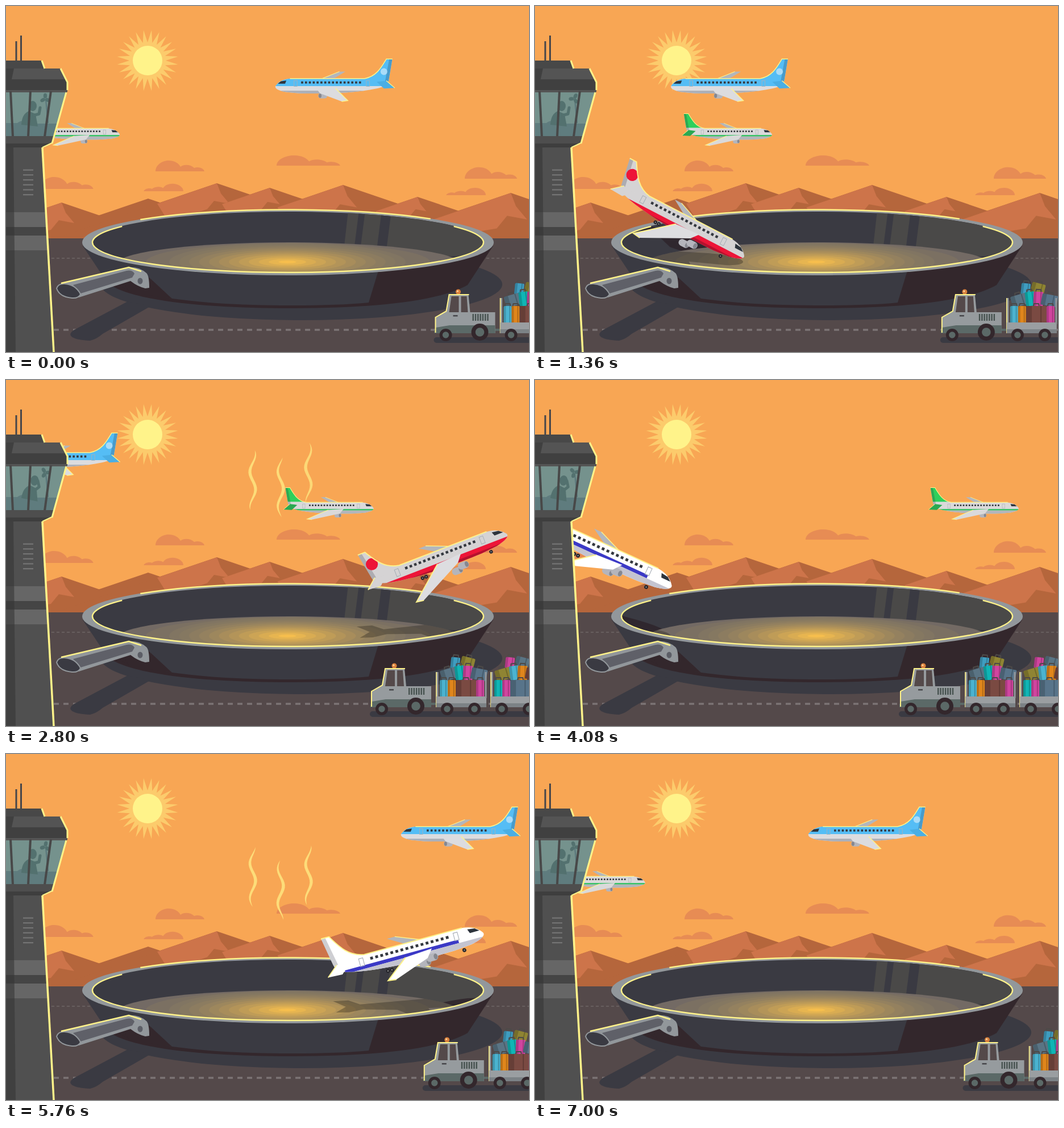
These frames come from a looping animation (920x609 px, 7040 ms). An HTML page:

```html
<!DOCTYPE html>
<html lang="en">
<head>
<meta charset="utf-8">
<title>Airport frying pan</title>
<style>
html, body { margin: 0; width: 100%; height: 100%; overflow: hidden; background: #f8a654; }
svg { display: block; width: 100%; height: 100%; }
</style>
</head>
<body>
<svg id="stage" viewBox="0 0 920 609"></svg>
<script>
const LOOP = 7040, GLOW = '#fff38a', DARK = '#3a3a42', DEEP = '#33272c', STEEL = '#92979b';
const { sin, cos, PI, hypot } = Math;

// Shape helpers
const poly = (pts, fill, more = '') => `<polygon points="${pts}" fill="${fill}" ${more}/>`;
const path = (d, fill, more = '') => `<path d="${d}" fill="${fill}" ${more}/>`;
const line = (pts, color, w = 2, more = '') =>
  `<polyline points="${pts}" fill="none" stroke="${color}" stroke-width="${w}" ${more}/>`;
const oval = (x, y, rx, ry, fill, more = '') =>
  `<ellipse cx="${x}" cy="${y}" rx="${rx}" ry="${ry}" fill="${fill}" ${more}/>`;
const dot = (x, y, r, fill) => oval(x, y, r, r, fill);
const box = (x, y, w, h, fill, more = '') =>
  `<rect x="${x}" y="${y}" width="${w}" height="${h}" fill="${fill}" ${more}/>`;
const group = (body, more = '') => `<g ${more}>${body}</g>`;
const range = (n, f) => Array.from({ length: n }, (_, i) => f(i)).join(' ');

function sky() {
  const rays = range(48, i => {
    const a = (i + 1) * PI / 24, r = i % 2 ? 32 : 54;
    return `${249 + r * cos(a)},${96 + r * sin(a)}`;
  });
  const cloud = (x, y, w, h = Math.abs(w)) =>
    path('M0,0c0-12 13-19 23-19s17 4 21 11c6-5 18-4 24 2c8-3 17 1 18 6z', '#e78c54',
      `transform="translate(${x} ${y}) scale(${w} ${h})"`);
  return box(0, 0, 920, 609, '#f8a654') + poly(rays, '#fccb6c') + dot(249, 96, 26, GLOW) +
    cloud(263, 291, 1) + cloud(312, 326, -.81, .7) + cloud(476, 281, 1.3, .95) +
    cloud(807, 304, 1.07) + cloud(844, 333, -.81, .68) + cloud(59, 322, 1.1);
}

// Every mountain has the same slopes; k sizes its sunlit face
function mountain([x, y, k]) {
  const foot = 412 - y, at = (dx, dy) => `${x + dx * k},${y + dy * k}`;
  return poly(`${x},${y} ${x + foot / .34},412 ${x - foot / .34},412`, '#b5663c') +
    poly([at(0, 0), at(7, 18), at(22, 36), at(-5, 31), at(-19, 48), at(-90, 60), at(-105, 36)].join(' '), '#cd744a');
}

function land() {
  return [[250, 339, 0], [98, 346, 1], [371, 312, 1], [464, 320, .8], [593, 315, 1.1], [724, 336, .7], [888, 329, 1.3]]
    .map(mountain).join('') +
    box(0, 409, 920, 200, '#54494a') +
    line('80,444 920,444', '#6e6566', 1.5, 'stroke-dasharray="5 4"') +
    line('84,570 920,570', '#7b7374', 3.5, 'stroke-dasharray="9 8"');
}

const inner = oval(496, 415.5, 344, 53.5, DARK);
const floorOval = fill => oval(497, 454, 302, 38, fill);

function floor() {
  const mix = (a, b, k) => Math.round(a + (b - a) * k);
  const rings = range(12, i => {
    const rx = 208 - i * 17.5, k = (i / 11) ** 1.4;
    return oval(495, 450.5, rx, rx * .16, `rgb(${mix(129, 246, k)},${mix(117, 190, k)},${mix(98, 77, k)})`);
  });
  return floorOval('#736a64') + oval(496, 451, 250, 34, '#7b7062') + rings;
}

const shadePath = 'M0,0C-5,-9-40,-9-60,-9L-215,-4-235,-12-262,-12-240,-1-258,8-235,9-210,5-150,9-130,18-90,18-95,9-30,9Q0,7 0,0Z';
const shades = (kind, fill) => range(2, i => path(shadePath, fill, `id="${kind}${i}"`));

// Lit part of a rim ellipse between two angles in degrees
function rim(rx, ry, from, to) {
  const at = a => `${496 + rx * cos(a * PI / 180)},${416 + ry * sin(a * PI / 180)}`;
  return path(`M${at(from)}A${rx},${ry} 0 ${to - from > 180 ? 1 : 0} 1 ${at(to)}`, 'none',
    `stroke="${GLOW}" stroke-width="2.4"`);
}

function pan() {
  const stripe = (x, w) => poly(`${x},360 ${x + w},360 ${x + w - 9},430 ${x - 9},430`, DARK);
  return oval(520, 490, 353, 63, DARK) +
    path('M214,520L120,570C104,580 118,588 148,589Q160,586 170,577L255,528Z', DARK) +
    path('M135,422L182,490C230,522 370,532 500,532C640,532 760,521 812,491L857,422Z', DEEP) +
    path('M135,422L172,478C230,517 370,527 500,527C550,527 600,526 638,522L655,466Z', DARK) +
    poly('252,478 292,515 225,505 190,488', DEEP) +
    oval(496, 416, 362, 58, STEEL) + inner +
    group(
      path('M602,360L593,440H860V360Z', '#4a4948') + stripe(621, 11) + stripe(661, 17) +
      group(shades('wall', '#2e242a'), 'opacity=".8"') + floor() +
      group(group(shades('floor', '#1c1a14'), 'opacity=".32"'), 'clip-path="url(#base)"'),
      'clip-path="url(#inside)"') +
    rim(361, 57.5, -136, -46) + rim(344, 53, -32, 212) +
    // handle
    poly('190,486 208,488 216,502', DEEP) +
    path('M100,488L215,460Q233,458 247,470Q252,475 252,496L245,497Q232,494 219,484L128,513Z', STEEL) +
    path('M118,491L212,466Q222,464 226,471L222,478L131,506Z', '#5f6068') +
    path('M89,497Q92,488 103,489Q122,490 131,507Q128,515 116,514Q94,512 89,497Z', DARK,
      `stroke="${STEEL}" stroke-width="2"`) +
    oval(236, 484, 4.5, 5.5, '#5c5e66') +
    line('97,488 216,460 238,467', GLOW, 2.5);
}

// One airliner shape, 100 units long, nose at the origin and pointing right
const HULL = 'M0,0C-2,-3-6,-6.3-14,-6.3H-74C-84,-8-88,-16-92,-22.5H-97L-94,-5C-93,0-88,1-84,2C-66,6-40,6.5-20,6L-9,5Q1,3 0,0Z';

function jet(id, { length, turn = 1, skin, wing = skin, stab = skin, tip: [tx, ty], bands, mark = '', engines = 1, gear = 0 }) {
  const engine = i => box(-43 + i * 5, ty * .35 + 1.5 - i * 2, 7.5, 4.6, '#b4b5bc', 'rx="2.3"') +
    oval(-37 + i * 5, ty * .35 + 3.8 - i * 2, 1.2, 1.8, '#85878f');
  const tyre = x => dot(x, 7.2, 1.2, '#26262c') + dot(x, 7.2, .4, '#999');
  const door = x => box(x, -4.6, 2.6, 4.8, 'none', 'stroke="#a9b0b8" stroke-width=".4"');
  const plane = (gear ? [-60, -62.5, -14].map(tyre).join('') : '') +
    poly('-58,-12 -53,-12 -38,-6 -48,-6', '#b3b6bc') + line('-53,-12 -38,-6', GLOW, .5) +
    path(HULL, skin) +
    group(bands.map(([top, bottom, color, x0 = -100, x1 = 0]) => box(x0, top, x1 - x0, bottom - top, color)).join('') +
      poly('-98,-23 -94.5,-23 -91,-4 -95,-4', '#223', 'opacity=".22"'), 'clip-path="url(#hull)"') + mark +
    path('M-12,-6.3H-74C-84,-8-88,-16-92,-22.5H-97', 'none', `stroke="${GLOW}" stroke-width=".7"`) +
    poly('-99,1.5 -92,-4.5 -84,-3.5 -90,2', stab) + line('-92,-4.5 -99,1.5', GLOW, .6) +
    line('-71,-3 -20,-3', '#34383f', 1.7, 'stroke-dasharray="1.7 1.5"') + door(-18) + door(-78) +
    poly('-9,-4.6 -4.5,-4 -2,-2 -8,-2', '#2c333c') +
    range(engines, engine) +
    poly(`${tx},${ty} -50,2 -33,1 -37,6 ${tx + 5},${ty + .7}`, wing) +
    line(`${tx + 5},${ty + .7} ${tx},${ty} -50,2`, GLOW, .7);
  return group(group(plane, `transform="scale(${turn * length / 100} ${length / 100})"`), `id="${id}"`);
}

function fleet() {
  return jet('blue', { length: 212, turn: -1, skin: '#dcdcdf', tip: [-60, 12], stab: '#4aaee4',
      bands: [[-25, 0, '#55bdf5'], [3.8, 8, '#adb0b8']], mark: dot(-90, -12, 2.8, '#a9dcf8') }) +
    jet('green', { length: 160, skin: '#dad9da', tip: [-73, 12], stab: '#2aa852',
      bands: [[-25, -7, '#2ecf5c'], [1, 2.6, '#2fc15f'], [2.6, 8, '#b3b5ba']] }) +
    jet('jet0', { length: 266, skin: '#d5d3d4', wing: '#dddde0', tip: [-72, 20.5], engines: 2, gear: 1,
      bands: [[1.6, 8, '#ed1538'], [4.4, 8, '#b5122e']], mark: dot(-90.5, -13.5, 4, '#ed1538') }) +
    jet('jet1', { length: 287, skin: '#fff', tip: [-64, 13], engines: 2, gear: 1,
      bands: [[0, 2.2, '#3b39c6', -88, -16], [2.2, 8, '#c4c4d0']] });
}

// Luggage train
const PAINT = ['#4bb3d0', '#e0861c', '#7a4a42', '#d0459f', '#5a7484', '#10b5b5', '#d0459f', '#58748a', '#3f9dc0', '#8f8433'];

function bag(x, y, w, h, color, turn = 0) {
  const grip = `${x + w / 2 - 5},${y} ${x + w / 2 - 4},${y - 4} ${x + w / 2 + 4},${y - 4} ${x + w / 2 + 5},${y}`;
  return group(line(grip, '#4d4a48', 2) + box(x, y, w, h, color, 'rx="2"') +
    box(x, y, w * .28, h, '#000', 'opacity=".17"') + box(x + w * .7, y, 2, h, '#000', 'opacity=".2"'),
    `transform="rotate(${turn} ${x + w / 2} ${y + h / 2})"`);
}

const wheel = (x, y, r) => dot(x, y, r, DEEP) + dot(x, y, r * .52, '#5b6967');

function cart(x, shift) {
  const paint = i => PAINT[(i + shift) % PAINT.length];
  let low = x + 6, mid = x + 8;
  const top = range(2, i => bag(x + 25 + i * 18, 488, 16 + i * 8, 25 - i * 6, paint(8 + i), 6 + i * 8));
  const middle = range(4, i => {
    const side = i % 3 === 0, w = side ? 28 : 17;
    mid += w - 3;
    return bag(mid - w + 3, side ? 508 : 503, w, side ? 20 : 25, paint(4 + i), i * 9 - 16);
  });
  const bottom = range(4, i => {
    const w = i === 2 ? 36 : 14;
    low += w;
    return bag(low - w, 528, w, 30, paint(i));
  });
  return top + middle + bottom +
    line(`${x + 1.5},514 ${x + 1.5},576`, STEEL, 4) + line(`${x},514 ${x},576`, GLOW, 1.6) +
    box(x, 557, 88, 19, '#9a9ea1') + box(x, 569, 88, 7, '#7c8286') +
    line(`${x + 87},514 ${x + 87},560`, STEEL, 3) + wheel(x + 19, 579, 11) + wheel(x + 67, 579, 11);
}

function train() {
  const glass = '#54494a', trim = '#5b6967';
  return box(640, 583, 330, 10, DARK, 'rx="5"') + box(746, 568, 14, 4, trim) +
    cart(757, 0) + cart(853, 5) +
    dot(683, 503, 4.5, '#d9803c') + dot(682, 502, 1.6, '#ffd7a0') +
    path('M643,576V548L662,537 667,508H701L704,539H748V576Z', '#969b9e') +
    poly('671,511 684,511 684,539 667,539', glass) + poly('688,511 698,511 700,539 688,539', glass) +
    path('M643,576V566L668,562H748V576Z', trim) +
    range(7, i => box(708 + i * 4.3, 542, 2.4, 12, '#46524f')) +
    box(674, 544, 8, 2.5, '#46464a') + box(641, 570, 9, 6, trim) +
    line('643,575 643,548 662,537 667,508 702,508', GLOW, 2) + wheel(661, 579, 11) + wheel(721, 574, 15);
}

function tower() {
  const edge = (pts, w = 3) => line(pts, GLOW, w), bar = pts => line(pts, '#484848', 4);
  const man = '#53716f';
  return line('18,62 18,98', '#46464a', 3) + line('26.5,52 26.5,98', '#46464a', 3) +
    poly('0,96 62,96 68,111 0,111', '#484848') +
    poly('0,110 96,110 108,134 108,151 0,151', '#404040') + poly('14,110 95,110 105,129 10,129', '#545454') +
    poly('0,148 108,148 107,153 0,153', '#555') +
    poly('0,152 106,152 84,230 0,230', '#75928d') +
    path('M0,206H20Q30,198 40,207H90L84,230H0Z', '#58757a', 'opacity=".75"') +
    group(path('M27,209Q28,190 40,185L52,190 56,212Z', man) + oval(47, 176, 7, 9, man) +
      group(line('50,192 58,190 60,179', man, 5, 'stroke-linecap="round" stroke-linejoin="round"'), 'id="arm"'),
      'id="man"') +
    line('70,165 74,206', '#58757a', 2) +
    group(range(3, i => oval(0, -5, 3.2, 4.6, man, `transform="rotate(${i * 120})"`)), 'id="fan"') +
    bar('8,150 12,230') + bar('43,150 39,230') + bar('79,150 68,230') +
    poly('0,229 84,229 80,242 64,250 0,250', '#4e4e4e') + poly('0,242 79,242 64,250 0,250', '#3e3e3e') +
    poly('0,249 64,249 84,609 0,609', '#505050') +
    poly('0,363 71,363 74,430 0,430', '#666') + poly('0,389 72,389 73,404 0,404', '#454545') +
    poly('0,249 13,249 17,609 0,609', '#363636', 'opacity=".6"') +
    range(6, i => box(30, 287.5 + i * 8.7, 18, 2.3, '#737373')) +
    edge('63,96 68,110') + edge('96,110 108,134 108,148') + edge('106,152 81,242') +
    edge('81,241 64,249', 2) + edge('64,249 84,609', 3.5);
}

const $ = id => document.getElementById(id);
$('stage').innerHTML =
  `<defs><clipPath id="inside">${inner}</clipPath><clipPath id="base">${floorOval('#000')}</clipPath>` +
  `<clipPath id="hull">${path(HULL, '#000')}</clipPath></defs>` +
  sky() + land() + pan() + range(3, i => path('', '#fddc79', `id="steam${i}"`)) +
  fleet() + group(train(), 'id="train"') + tower();

const clamp = v => Math.max(0, Math.min(1, v));
const ease = (t, start, span) => (1 - cos(PI * clamp((t - start) / span))) / 2;
const soft = (v, bend) => (v + hypot(v, bend)) / 2; // rounded max(0, v)
const place = (id, x, y, r = 0) => $(id).setAttribute('transform', `translate(${x} ${y}) rotate(${r})`);

// Dive, touch down at 1830 ms, roll and climb away at steady forward speed
function fly(i, t) {
  const left = 1830 - t, pitch = 1.4 + ease(left, 0, 430) * (29.5 - .0073 * left) - 26.5 * ease(t, 2204, 800);
  const a = pitch * PI / 180;
  const x = 119 + .352 * (t - 990) + 134 * cos(a);
  const y = 428 - .2 * soft(1590 - t, 120) - .24 * soft(t - 2355, 100) + 134 * sin(a);
  const ground = 450 + Math.min(0, pitch) * 1.1;
  place('jet' + i, x, y, pitch);
  place('wall' + i, x - 2, ground, pitch * .7);
  place('floor' + i, x - 2, ground, pitch * .2);
}

// A tapered ribbon that waves while it rises
function steam(i, x, top, phase) {
  const side = s => range(25, n => {
    const k = (s > 0 ? n : 24 - n) / 24, y = k * 105;
    return `${x - 5 * cos((y - phase) * PI / 31) + s * 2.8 * sin(PI * k) ** .7},${top + y}`;
  });
  $('steam' + i).setAttribute('d', `M${side(1)} ${side(-1)}Z`);
  $('steam' + i).setAttribute('opacity', clamp((330 - top) / 20) * clamp((top - 92) / 20));
}

function draw(t) {
  const bx = 474 - t * 1215 / LOOP, gx = 200 + t * 1123 / LOOP;
  place('blue', bx < -215 ? bx + 1215 : bx, 141);
  place('green', gx > 1082 ? gx - 1123 : gx, 225.5);
  place('train', 112.5 * (1 - ease(t, 680, 1680) + ease(t, 4730, 1421)), 0);
  fly(0, t);
  fly(1, (t - 3090 + LOOP) % LOOP);

  // Each landing sends up three wisps
  const u = (t < 3900 ? t + 3180 : t) - 5760;
  [[434, 164, .183, 28], [483, 187, .229, 14], [532, 161, .229, 33]].forEach(([x, y, speed, phase], i) =>
    steam(i, x, y - u * speed, phase + u * .045));

  const slump = ease(t, 2000, 500) - ease(t, 4360, 400);
  $('man').setAttribute('transform', `rotate(${slump * 6} 40 208)`);
  $('arm').setAttribute('transform', `rotate(${slump * -28} 50 192)`);
  place('fan', 69, 163, t / LOOP * 360 * 9);
}

function tick() {
  draw(Math.floor(performance.now() % LOOP / 40) * 40);
  requestAnimationFrame(tick);
}
tick();
</script>
</body>
</html>
```
